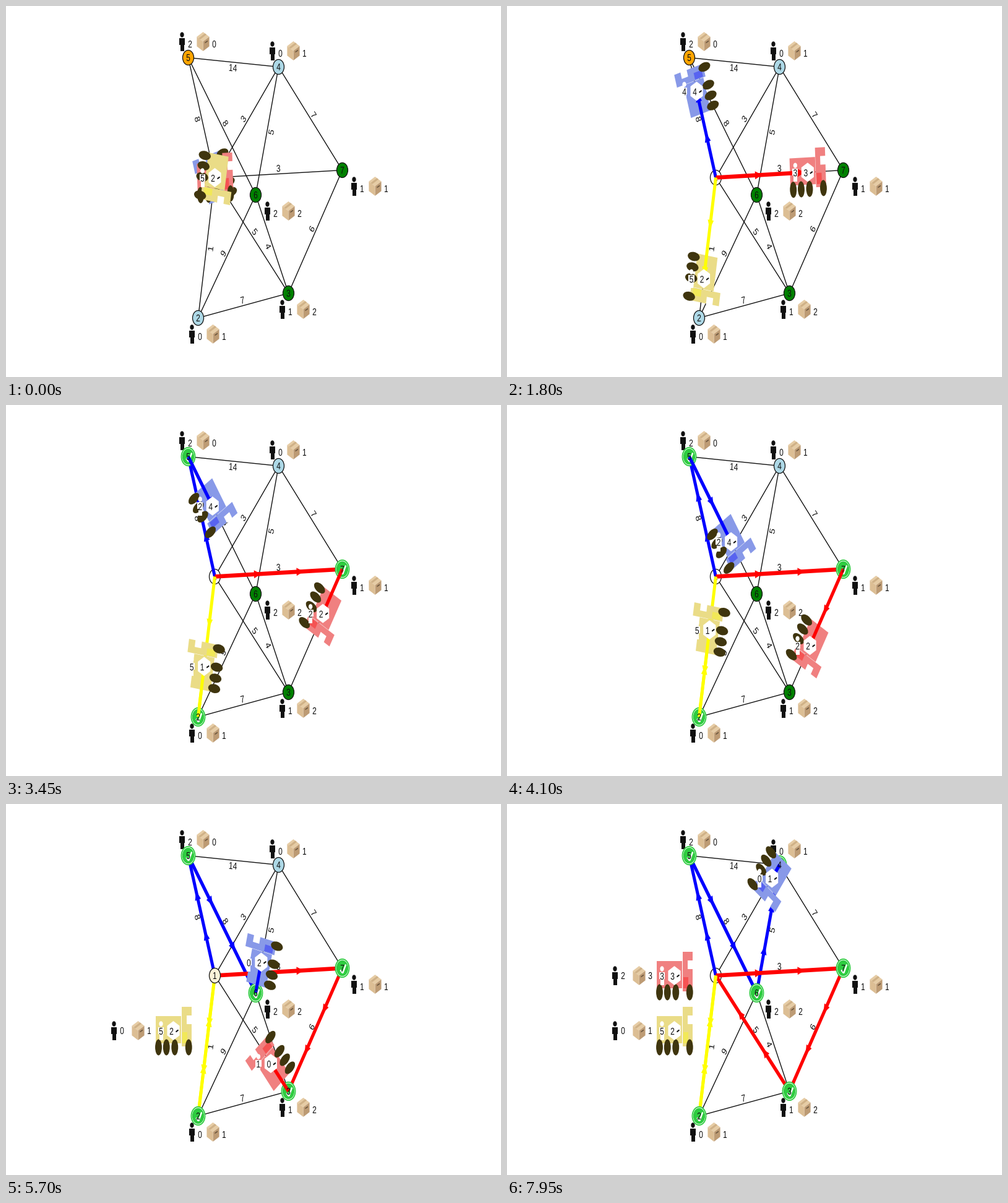
Write a matplotlib script that moves like this. It is 800x600 px and loops after 8 s.

```python
import math

import matplotlib.pyplot as plt
from matplotlib.animation import FuncAnimation
from matplotlib.colors import to_rgb
from matplotlib.patches import Circle, Ellipse, PathPatch, Polygon
from matplotlib.textpath import TextPath
from matplotlib.transforms import Affine2D

W, H = 800, 600
SQUEEZE = 0.75          # the whole scene is drawn square, then narrowed
FRAMES, INTERVAL = 160, 50
LEG = 51                # frames per route leg, both ends included
DEPOT = 1

FONT = {"family": "Liberation Sans"}
INK = "#101010"
WHEEL = "#3f350e"
CHECK = "#2ecc40"


def world(x, y):
    return x / SQUEEZE, y


# place, people and boxes wanted
PLACE = {1: (337, 277), 2: (310, 504), 3: (456, 464), 4: (440, 98),
         5: (294, 83), 6: (403, 305), 7: (543, 265)}
WANT = {1: (0, 0), 2: (0, 1), 3: (1, 2), 4: (0, 1),
        5: (2, 0), 6: (2, 2), 7: (1, 1)}
NODES = {n: world(*p) for n, p in PLACE.items()}

# the cost is written on the left of the way from the first to the second
COSTS = {(4, 5): 14, (1, 5): 8, (5, 6): 8, (1, 4): 3, (4, 6): 5,
         (4, 7): 7, (1, 7): 3, (1, 2): 1, (1, 3): 5, (2, 6): 9,
         (3, 6): 4, (2, 3): 7, (3, 7): 6}

# line colour, body colour, stops, room for people and boxes
TRUCKS = [("#0000ff", "#8899e8", [1, 5, 6, 4, 1], (4, 4)),
          ("#ff0000", "#f08080", [1, 7, 3, 1], (3, 3)),
          ("#ffff00", "#eadc87", [1, 2, 1], (5, 2))]

fig = plt.figure(figsize=(W / 100, H / 100), dpi=100, facecolor="white")
ax = fig.add_axes([0, 0, 1, 1])
# whole coordinates mean pixel centres
ax.set_xlim(-0.5 / SQUEEZE, (W - 0.5) / SQUEEZE)
ax.set_ylim(H - 0.5, -0.5)
ax.axis("off")

moving = []
glyphs = {}


def put(patch, z):
    patch.set_zorder(z)
    ax.add_patch(patch)
    moving.append(patch)


def turn(point, origin, angle):
    (x, y), c, s = point, math.cos(angle), math.sin(angle)
    return origin[0] + x * c - y * s, origin[1] + x * s + y * c


def poly(points, color, z, origin=(0, 0), angle=0):
    pts = [turn(p, origin, angle) for p in points]
    put(Polygon(pts, closed=True, fc=color, lw=0), z)


def rect(x0, y0, x1, y1):
    return [(x0, y0), (x1, y0), (x1, y1), (x0, y1)]


def disc(p, r, color, z, edge="none", lw=0):
    put(Circle(p, r, fc=color, ec=edge, lw=lw), z)


def text(s, p, z, angle=0):
    s = str(s)
    if s not in glyphs:
        path = TextPath((0, 0), s, size=16, prop=FONT)
        box = path.get_extents()
        glyphs[s] = path.transformed(
            Affine2D().translate(-(box.x0 + box.x1) / 2,
                                 -(box.y0 + box.y1) / 2).scale(1, -1))
    place = Affine2D().rotate(angle).translate(*p)
    put(PathPatch(glyphs[s].transformed(place), fc=INK, lw=0), z)


def shift(p, dx, dy):
    """Move a world point by stage pixels."""
    return p[0] + dx / SQUEEZE, p[1] + dy


def between(a, b, t):
    return a[0] + (b[0] - a[0]) * t, a[1] + (b[1] - a[1]) * t


def mix(a, b, t):
    return tuple(u + (v - u) * t for u, v in zip(to_rgb(a), to_rgb(b)))


def heading(a, b):
    return math.atan2(b[1] - a[1], b[0] - a[0])


def bar(a, b, width, color, z):
    poly(rect(0, -width / 2, math.dist(a, b), width / 2), color, z,
         a, heading(a, b))


def person(p, color, z):
    disc(shift(p, 0, -11), 4.2, color, z)
    poly(rect(-6.2, -6, 6.2, 5), color, z, p)
    poly(rect(-4, 5, 4, 15.5), color, z, p)


# clockwise from the top corner
HEXAGON = [(15.5 * math.sin(k * math.pi / 3), -15.5 * math.cos(k * math.pi / 3))
           for k in range(6)]


def parcel(p, z):
    for k, color in ((5, "#e6cca5"), (1, "#bd9b74"), (3, "#dcbe94")):
        face = [HEXAGON[(k + j) % 6] for j in range(3)] + [(0, 0)]
        poly(face, color, z, p)
    top, right, _, _, _, left = HEXAGON
    tape = [between(top, right, t) for t in (0.3, 0.55)]
    tape += [between(left, (0, 0), t) for t in (0.55, 0.3)]
    poly(tape, "#cfb187", z, p)
    poly([(4, 1), (10, -2), (10, 0), (4, 3)], "#6b563e", z, p)


def demand(p, amounts, z, gap=34, drop=4):
    person(p, INK, z)
    text(amounts[0], shift(p, 13, drop), z)
    parcel(shift(p, gap, 0), z)
    text(amounts[1], shift(p, gap + 18, drop), z)


def route_line(a, b, done, color, z):
    """Thick line grown to the share done, with heads at each third."""
    bar(a, between(a, b, done), 6.6, color, z)
    for third in (1 / 3, 2 / 3):
        if done >= third:
            poly([(8, 0), (-7, -6.5), (-7, 6.5)], color, z,
                 between(a, b, third), heading(a, b))


def truck_body(p, angle, body, dark, z):
    parts = [(rect(-38, -24, 17, 20), body), (rect(17.5, -39, 39, 25), body),
             (rect(28, -25, 40, -11), "white"), (rect(19, 2, 30, 20), dark)]
    for shape, color in parts:
        poly(shape, color, z, p, angle)
    for x in (-32, -15, 3, 33):
        put(Ellipse(turn((x, 27), p, angle), 14.5, 26,
                    angle=math.degrees(angle), fc=WHEEL, lw=0), z)


def truck_load(p, load, z):
    seats = shift(p, -20, 0)
    person(seats, "white", z)
    text(load[0], shift(seats, 0, 1), z)
    poly(HEXAGON, "white", z, p)
    text(load[1], shift(p, -3, 1), z)
    bar(shift(p, 4, 2), shift(p, 8, -1), 2.2, INK, z)


def node(n, visited, z, z_label):
    p = NODES[n]
    people, boxes = WANT[n]
    if visited:
        disc(p, 14.7, "white", z, CHECK, 1.3)
        disc(p, 12.8, CHECK, z)
        elbow = (p[0] + 1, p[1] + 8)
        bar(elbow, shift(elbow, -4, -5), 3, "white", z)
        bar(elbow, shift(elbow, 5, -14), 3, "white", z)
    else:
        if people and boxes:
            color = "#008000"
        elif people or boxes:
            color = "#ffa500" if people else "#add8e6"
        else:
            color = "#fdf3d8" if z > 3 else "white"
        disc(p, 12, color, z, INK, 0.9)
    text(n, p, z_label)


def background():
    for (a, b), cost in COSTS.items():
        pa, pb = NODES[a], NODES[b]
        ax.plot(*zip(pa, pb), color=INK, lw=1, zorder=1)
        ang = heading(pa, pb)
        spot = turn((0, -9), between(pa, pb, 0.5), ang)
        text(cost, spot, 1, ang if math.cos(ang) > 0 else ang + math.pi)
    for n, (x, y) in PLACE.items():
        if n != DEPOT:
            inner = 200 < y < 400
            spot = world(x + (19 if inner else -10),
                         y + (26 if y > 200 else -26))
            demand(spot, WANT[n], 2)


def total(stops):
    return [sum(WANT[n][k] for n in stops) for k in (0, 1)]


def draw(i):
    while moving:
        moving.pop().remove()
    leg, step = divmod(i, LEG)
    done = step / (LEG - 1)
    visited = set()

    for k, (line, body, route, room) in enumerate(TRUCKS):
        z = 5 + k
        dark = mix(body, line, 0.35)
        legs = [(NODES[a], NODES[b]) for a, b in zip(route, route[1:])]
        visited.update(route[1:leg + 1])
        for a, b in legs[:leg]:
            route_line(a, b, 1, line, 3)
        if leg < len(legs):
            a, b = legs[leg]
            spot = between(a, b, done)
            truck_body(spot, heading(a, b), body, dark, z)
            if step:
                route_line(a, b, done, line, z + 0.2)
            used = total(route[:leg + 1])
        else:
            y = 277 + 89 * (k - 1)
            spot, used = world(270, y), (0, 0)
            truck_body(spot, 0, body, dark, z)
            demand(world(174, y), total(route), z, gap=39, drop=0)
        truck_load(spot, [r - u for r, u in zip(room, used)], z + 0.4)

    for n in NODES:
        if n == DEPOT:
            level = 4 if leg == 2 else 1.5
            node(n, False, level, level)
        else:
            node(n, n in visited, 4, 9)
    return moving


background()
moving.clear()
anim = FuncAnimation(fig, draw, frames=FRAMES, init_func=lambda: [],
                     interval=INTERVAL, repeat=True, repeat_delay=0,
                     blit=False)
plt.show()
```
